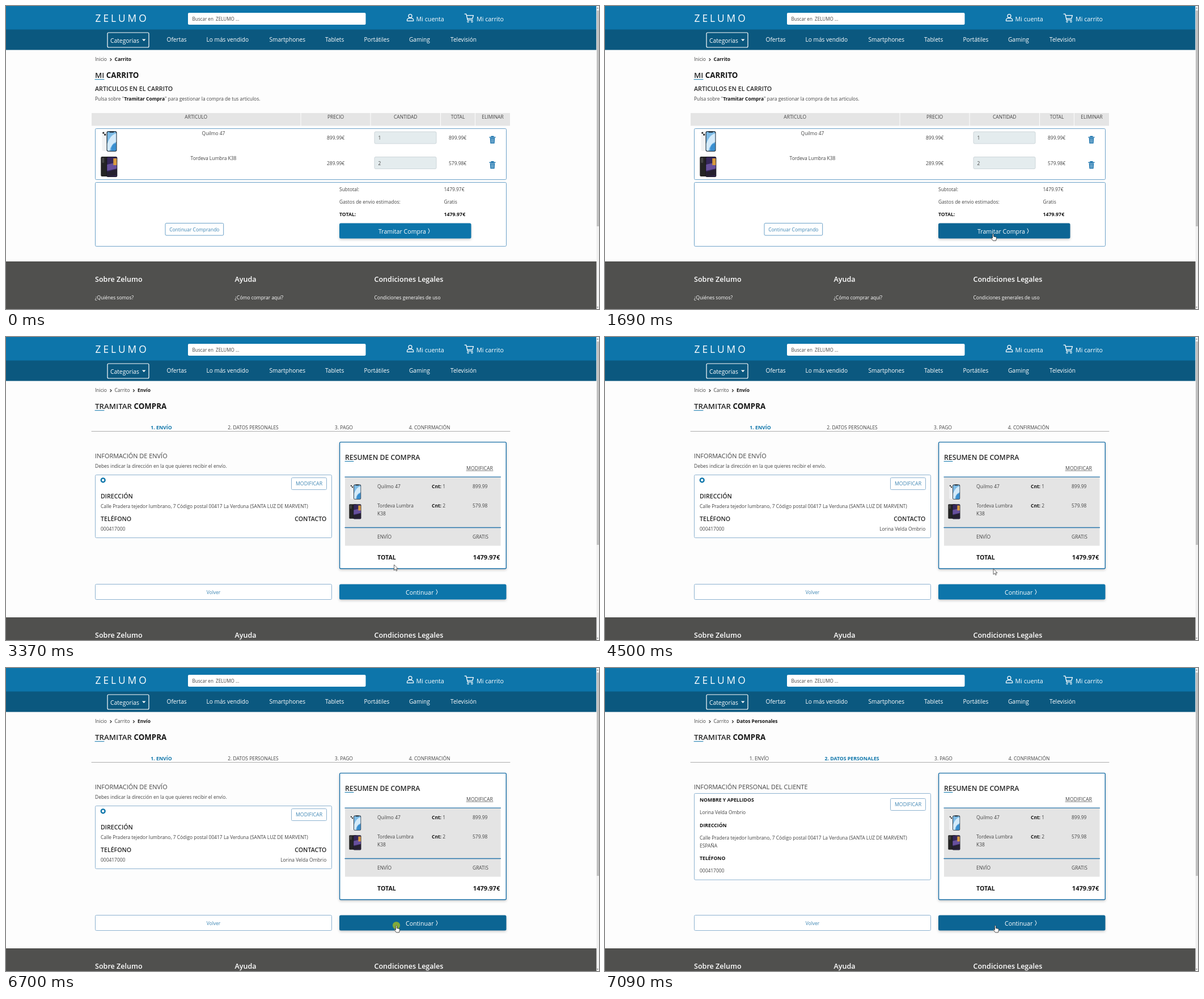
Animation, 1046 px wide and 535 px high, one loop 8 s. Source, as an HTML page:

```html
<!DOCTYPE html>
<html lang="es">
<head>
<meta charset="utf-8">
<title>Carrito</title>
<style>
  html, body { margin: 0; width: 100%; height: 100%; overflow: hidden; background: #fdfdfd; }
  svg { display: block; width: 100%; height: 100%; }
  text { font-family: "Open Sans", "Noto Sans", sans-serif; fill: #444; white-space: pre; }
  .b { font-weight: 700; fill: #151515; }
  .m { font-weight: 600; fill: #262626; }
  .s { font-weight: 600; }
  .c { text-anchor: middle; }
  .e { text-anchor: end; }
  .w { fill: #fff; }
  .l { fill: #3d85b3; }
  .on { font-weight: 700; fill: #0d75aa; }
  .box { fill: #fff; stroke: #8db2d0; }
  #cart .box { stroke: #6ba1c8; }
  .line { fill: none; stroke-linecap: round; stroke-linejoin: round; }
  .go { filter: drop-shadow(0 2px 2px #0003); }
  .summary { fill: #fff; stroke: #1a70a8; stroke-width: 1.4; filter: drop-shadow(0 2px 2px #0003); }
</style>
</head>
<body>
<svg id="stage" viewBox="0 0 1046 535"></svg>
<script>
const LOOP = 8000;
const BLUE = '#0d75aa';
const PHONES = ['Quilmo 47', 'Tordeva Lumbra', 'K38'];
const BUYER = 'Lorina Velda Ombrio';
const ADDRESS = 'Calle Pradera tejedor lumbrano, 7 Código postal 00417 La Verduna (SANTA LUZ DE MARVENT)';
const TELEPHONE = '000417000';

const text = (x, y, s, cls = '', size = 8.45) =>
  `<text x="${x}" y="${y}" class="${cls}" font-size="${size}">${s}</text>`;
const rect = (x, y, x2, y2, attrs) =>
  `<rect x="${x}" y="${y}" width="${x2 - x}" height="${y2 - y}" ${attrs}/>`;
const box = (x, y, x2, y2, cls = 'box') => rect(x, y, x2, y2, `rx="2" class="${cls}"`);
const line = (d, color, width = 1) =>
  `<path d="${d}" class="line" stroke="${color}" stroke-width="${width}"/>`;
const group = (id, ...parts) => `<g id="${id}">${parts.join('')}</g>`;
const at = (x, y, s, scale = 1) => `<g transform="translate(${x} ${y}) scale(${scale})">${s}</g>`;
const chevron = x => line(`M${x} 92.7l2 2-2 2`, '#222', 1.2);

const goButton = (x, y, x2, y2, label, labelX, arrowX) =>
  rect(x, y, x2, y2, 'rx="2.5" class="go"') +
  text(labelX, y + 18, label, 'w', 10.6) +
  line(`M${arrowX} ${y + 9.5}l2 4.2-2 4.2`, '#fff', 1);

const editButton = y =>
  box(503.5, y, 565.5, y + 21) + text(534.5, y + 13.7, 'MODIFICAR', 'c l', 8.8);

const footer = y =>
  rect(0, y, 1041.5, 535, 'fill="#50504e"') +
  [[157, 'Sobre Zelumo', '¿Quiénes somos?'],
   [403.5, 'Ayuda', '¿Cómo comprar aquí?'],
   [649.5, 'Condiciones Legales', 'Condiciones generales de uso']]
    .map(([x, title, link]) => text(x, y + 35.6, title, 'w s', 12.55) + text(x, y + 66.5, link, 'w'))
    .join('');

const lightPhone =
  rect(1, 0, 14, 35, 'rx="2.5" fill="#f1f2f3"') +
  '<circle cx="3.3" cy="3" r="1.6" fill="#222"/><circle cx="6.2" cy="6.2" r="1.6" fill="#222"/>' +
  rect(9, 0, 27, 36, 'rx="3" fill="#1d2a35"') +
  rect(10.2, 1.2, 25.8, 34.8, 'rx="2" fill="#7dbbe6"') +
  '<path d="M10.2 22Q16 6 25.8 4V19Q17 22 14 34.8H12Q10.2 34 10.2 33Z" fill="#d3eafa"/>' +
  '<path d="M17 34.8Q16 23 25.8 21V33Q25.8 34.8 24 34.8Z" fill="#3a8fd0"/>' +
  rect(14, 0, 22, 2.4, 'rx="1" fill="#1d2a35"');

const darkPhone =
  rect(0, 0, 18, 35, 'rx="2" fill="#242424"') +
  rect(2, 2, 6, 11, 'rx="1.5" fill="#454545"') +
  rect(10, 0, 29, 36, 'rx="2.5" fill="#17161c"') +
  rect(11, 1, 28, 35, 'rx="1.5" fill="#35275a"') +
  '<path d="M11 14L28 10V21L11 25Z" fill="#67509c"/><path d="M11 27L28 22V33L11 35Z" fill="#25202f"/>' +
  rect(22, 3, 28, 15, 'fill="#d99b3d"');

const trash =
  '<path d="M-4.3-3.5H4.3L3.6 6.2H-3.6Z" fill="#1c74ad"/>' +
  line('M-5-4.8H5M-2-6.2H2', '#1c74ad', 1.5) +
  line('M-2-2L-1.7 4.5M0-2V4.5M2-2L1.7 4.5', '#d7eaf5', .7);

const header =
  rect(0, 0, 1041.5, 42, `fill="${BLUE}"`) + rect(0, 41.5, 1041.5, 77.6, 'fill="#0b587f"') +
  '<text x="157.5" y="28" class="w" font-size="17.4" letter-spacing="4">ZELUMO</text>' +
  rect(321, 12, 634.5, 33, 'rx="2" fill="#fff"') +
  text(328.5, 25.5, 'Buscar en  ZELUMO ...', '', 8.1) +
  line('M707.5 26.3V24.5Q708 21.8 711 21.5H715Q718.3 21.8 718.7 24.5V26.3Z', '#fff', 1.2) +
  '<circle cx="713" cy="17.7" r="3" fill="none" stroke="#fff" stroke-width="1.2"/>' +
  text(723.5, 26.5, 'Mi cuenta', 'w', 10.75) +
  line('M809 14H811.7L814.2 24.5H823M812.3 16.5H824.5L822.8 22.3H813.6', '#fff', 1.25) +
  '<g fill="none" stroke="#fff"><circle cx="815" cy="27.5" r="1.4"/><circle cx="822" cy="27.5" r="1.4"/></g>' +
  text(830, 26.5, 'Mi carrito', 'w', 10.75) +
  rect(179, 47, 252, 73, 'rx="2" fill="none" stroke="#fff" stroke-width="1.2"') +
  text(184, 64.5, 'Categorias', 'w', 10.3) +
  '<path d="M240 58.5H246.5L243.2 62Z" fill="#fff"/>' +
  [[283.5, 'Ofertas'], [353.5, 'Lo más vendido'], [464.5, 'Smartphones'], [563, 'Tablets'],
   [631.5, 'Portátiles'], [711, 'Gaming'], [784, 'Televisión']]
    .map(([x, s]) => text(x, 63.3, s, 'w', 10.15)).join('') +
  text(157, 97.2, 'Inicio') + chevron(184);

const scrollbar =
  rect(1041.5, 0, 1046, 535, 'fill="#f1f1f1"') +
  '<path d="M1042 4.5L1043.5 2.5 1045 4.5ZM1042 531L1043.5 533 1045 531Z" fill="#777"/>' +
  '<rect id="thumb" x="1042" y="8" width="4" fill="#c1c1c1"/>';

const columns = [[151, 519.5, 'ARTICULO'], [520.5, 642.5, 'PRECIO'], [643.5, 766, 'CANTIDAD'],
                 [767, 827, 'TOTAL'], [828, 889, 'ELIMINAR']];

const cartRow = (y, name, price, count, total) =>
  text(366, y + 6.5, name, 'c') + text(566, y + 15, price) +
  rect(650, y + 1, 759, y + 22, 'rx="2" fill="#e4ecee" stroke="#cdd6da"') +
  text(656.5, y + 15, count) + text(781, y + 15, total) + at(858, y + 15.5, trash);

const cart = group('cart',
  text(191.5, 97.2, 'Carrito', 'b'),
  text(157, 127.3, 'MI <tspan class="b">CARRITO</tspan>', 'm', 13.3),
  line('M157 129.7H173', BLUE),
  text(157, 150.3, 'ARTICULOS EN EL CARRITO', 'm', 10.7),
  text(157, 167.2, 'Pulsa sobre "<tspan class="b">Tramitar Compra</tspan>" para gestionar la compra de tus articulos.'),
  ...columns.map(([x, x2, s]) =>
    rect(x, 189, x2, 211.5, 'fill="#e5e5e5"') + text((x + x2) / 2, 199.2, s, 'c')),
  box(157.5, 216.5, 882.5, 306.5), box(157.5, 311.5, 882.5, 424.3),
  cartRow(221, PHONES[0], '899.99€', 1, '899.99€'),
  cartRow(265.5, PHONES[1] + ' ' + PHONES[2], '289.99€', 2, '579.98€'),
  at(168.5, 221, lightPhone), at(167.3, 266, darkPhone),
  text(588, 326.7, 'Subtotal:'), text(772.5, 326.7, '1479.97€'),
  text(588, 349, 'Gastos de envio estimados:'), text(772.5, 349, 'Gratis'),
  text(588, 371.3, 'TOTAL:', 'b', 8.7), text(772.5, 371.3, '1479.97€', 'b', 8.8),
  box(281, 383.5, 383.7, 405), text(332.3, 397.5, 'Continuar Comprando', 'c l'),
  goButton(588, 383.5, 820.5, 410.5, 'Tramitar Compra', 657, 745),
  footer(451));

const summaryRow = (y, name, count, total) =>
  text(655, y, name) + text(751, y, `<tspan class="b">Cnt:</tspan> ${count}`) + text(823, y, total);

const checkout = group('checkout',
  text(191.5, 97.2, 'Carrito'), chevron(224.5),
  text(157, 127.3, 'TRAMITAR <tspan class="b">COMPRA</tspan>', 'm', 13.3),
  line('M157 129.7H173', BLUE),
  line('M151 166.6H889', '#aaa'),
  box(588.6, 185.6, 882.3, 409, 'summary'),
  text(598, 217.3, 'RESUMEN DE COMPRA', 'm', 12.25), line('M598 219.5H613', BLUE),
  text(812, 234.5, 'MODIFICAR', '', 8.75), line('M812 236.2H859', '#666', .8),
  rect(598, 247, 872.5, 368.5, 'fill="#e4e4e4"'),
  line('M598 247.2H872.5M598 336.5H872.5', '#2876ac', 1.3),
  at(606.5, 260.5, lightPhone, .73), at(605.3, 295.3, darkPhone, .73),
  summaryRow(267, PHONES[0], 1, '899.99'), summaryRow(301.3, PHONES[1], 2, '579.98'),
  text(655, 314.8, PHONES[2]),
  text(655, 356.2, 'ENVÍO'), text(823, 356.2, 'GRATIS'),
  text(655, 392.8, 'TOTAL', 'b', 10.6), text(871.3, 392.8, '1479.97€', 'b e', 11.1),
  box(157.5, 436.5, 574.5, 463.5), text(366, 453.6, 'Volver', 'c l'),
  goButton(588, 436.5, 882.5, 463.5, 'Continuar', 705, 759),
  footer(495));

const steps = (active, centers) =>
  ['1. ENVÍO', '2. DATOS PERSONALES', '3. PAGO', '4. CONFIRMACIÓN']
    .map((s, i) => i === active ? text(centers[i], 162.5, s, 'c on', 8.75) : text(centers[i], 162.5, s, 'c'))
    .join('');

const shipping = group('shipping',
  text(232, 97.2, 'Envío', 'b'),
  steps(0, [274, 436, 596, 747]),
  text(157, 214, 'INFORMACIÓN DE ENVÍO', '', 10.95),
  text(157, 231, 'Debes indicar la dirección en la que quieres recibir el envío.'),
  box(157.5, 243.5, 574.5, 354.5), editButton(248.5),
  `<circle cx="171.2" cy="252.8" r="3.4" fill="#fff" stroke="${BLUE}" stroke-width="2.4"/>`,
  text(167, 285.2, 'DIRECCIÓN', 'm', 10.6), text(167, 301.7, ADDRESS),
  text(167, 325.3, 'TELÉFONO', 'm', 10.6), text(167, 341.8, TELEPHONE),
  text(565.3, 325.3, 'CONTACTO', 'm e', 10.6),
  group('contact', text(565.3, 341.8, BUYER, 'e')));

const personal = group('personal',
  text(232, 97.2, 'Datos Personales', 'b'),
  steps(1, [272, 435.5, 597, 748]),
  text(157, 214, 'INFORMACIÓN PERSONAL DEL CLIENTE', '', 10.95),
  box(157.5, 221.5, 574.5, 374), editButton(230.5),
  text(167, 235.8, 'NOMBRE Y APELLIDOS', 'b', 8.7), text(167, 258.3, BUYER),
  text(167, 280.5, 'DIRECCIÓN', 'b', 8.7), text(167, 303, ADDRESS), text(167, 316.5, 'ESPAÑA'),
  text(167, 338.7, 'TELÉFONO', 'b', 8.7), text(167, 361, TELEPHONE));

const cursor = group('cursor',
  '<circle id="click" r="6.6" fill="#92b42f" fill-opacity=".88"/>',
  '<path id="arrow" d="M0 0V10L2.3 7.9 3.9 11.2 5.4 10.5 3.9 7.3H7Z" fill="#fff" stroke="#222" stroke-width=".7"/>',
  '<path id="hand" d="M-1 1Q0-.7 1 1V5L5 5.8Q6.2 6.2 6 8.5L5 12.4H0L-3.4 8Q-3.2 6.3-1 8Z" fill="#fff" stroke="#222" stroke-width=".8"/>');

const stage = document.getElementById('stage');
stage.innerHTML = header + scrollbar + cart + checkout + shipping + personal + cursor;

const byId = id => document.getElementById(id);
const show = (id, on) => byId(id).style.display = on ? '' : 'none';
const within = (t, a, b) => t >= a && t < b;
const clamp = v => Math.min(1, Math.max(0, v));
const mix = (a, b, k) => a + (b - a) * k;

// Linear interpolation through [time, value] points.
function track(t, points) {
  const i = points.findIndex(p => p[0] > t);
  if (i < 0) return points[points.length - 1][1];
  if (i === 0) return points[0][1];
  const [t0, a] = points[i - 1], [t1, b] = points[i];
  return mix(a, b, (t - t0) / (t1 - t0));
}

// Button shade: 0 normal, 1 hovered, 2 pressed.
const shades = [[0, 0], [1480, 0], [1650, 1], [3180, 1], [3300, 2], [3370, 2], [3370, 0],
                [4850, 0], [5000, 1], [6700, 1], [6820, 2], [6890, 2], [6890, 0], [6940, 0], [7090, 1]];

function pointer(t) {
  const enter = 1 - (1 - clamp((t - 580) / 1110)) ** 1.5;
  const k = clamp((t - 4300) / 860);
  const down = k * k * (3 - 2 * k);
  return [mix(1003, 684.5, enter) + 4 * down, mix(530, 402, enter) + 52.5 * down];
}

function draw(t) {
  const bought = t >= 3370, next = t >= 6890;
  show('cart', !bought);
  show('checkout', bought);
  show('shipping', bought && !next);
  show('personal', next);
  show('contact', t >= 3500);
  byId('thumb').setAttribute('height', bought ? 359 : 381);

  const s = track(t, shades);
  const color = `rgb(${mix(13, 11, s / 2)},${mix(117, 85, s / 2)},${mix(170, 125, s / 2)})`;
  document.querySelectorAll('.go').forEach(b => b.style.fill = color);

  const hand = within(t, 1480, 3300) || t >= 4850;
  show('cursor', t >= 580);
  show('hand', hand);
  show('arrow', !hand);
  show('click', within(t, 3180, 3300) || within(t, 6700, 6820));
  byId('cursor').setAttribute('transform', `translate(${pointer(t)})`);
}

const start = performance.now();
function tick() {
  draw((performance.now() - start) % LOOP);
  requestAnimationFrame(tick);
}
tick();
</script>
</body>
</html>
```
